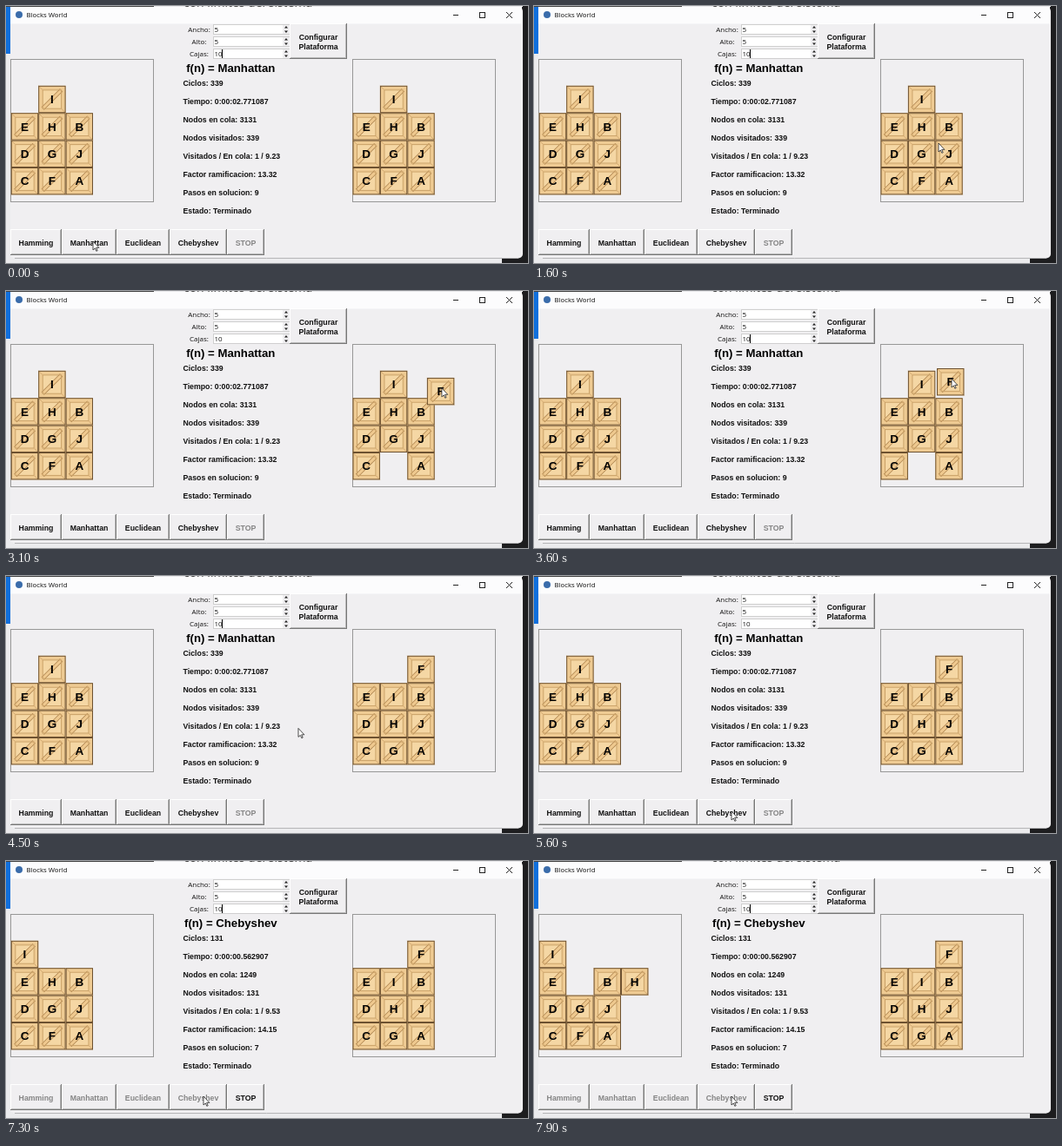
Write an HTML page with a canvas that moves like this. It is 600x296 px and loops after 8000 ms.

```html
<!DOCTYPE html>
<html lang="es">
<head>
<meta charset="utf-8">
<title>Blocks World</title>
<style>
  html, body { margin: 0; width: 100%; height: 100%; overflow: hidden; }
  canvas { display: block; }
</style>
</head>
<body>
<canvas id="stage" width="600" height="296"></canvas>
<script>
const ctx = document.getElementById('stage').getContext('2d');
const LOOP = 8000, TICK = 100;
const CELL = 31.4, LEFT_X = 5.8, RIGHT_X = 398.5, FLOOR_Y = 186;
const UI = '"Open Sans", sans-serif';
const BOLD = '"Liberation Sans", Arial, sans-serif';
const LABEL = 'bold 8.75px ' + BOLD;
const FACE = '#f0eff1', INK = '#111';

const GRAB = 2500, DROP = 4000, RUN = 6200, DONE = 6900;
const START = ['CDE', 'FGHI', 'AJB'];
const GOAL = ['CDE', 'GHI', 'AJBF'];
const ARROW = new Path2D('M0 0V10L2.3 8 3.8 11.3 5.2 10.7 3.7 7.4H6.9Z');

// Where the hand passes: the first button, the crate, its new place, the last button.
const HAND = [
  { t: 100, x: 100, y: 271 },
  { t: 1600, x: 465, y: 158 },
  { t: 2300, x: 447, y: 198 },
  { t: GRAB, x: 447, y: 198 },
  { t: 2700, x: 485, y: 153 },
  { t: 3050, x: 503, y: 113 },
  { t: 3600, x: 480, y: 101 },
  { t: 4200, x: 480, y: 101 },
  { t: 4700, x: 240, y: 225 },
  { t: 5400, x: 227, y: 271 }
];

// Each crate of the solution rises one cell, shifts sideways and then sinks.
const SOLUTION = [
  { letter: 'I', begin: 7100, col: 1, row: 3, shift: -1 },
  { letter: 'H', begin: 7600, col: 1, row: 2, shift: 2 }
];

const clamp = (v, low, high) => Math.min(high, Math.max(low, v));

function handAt(t) {
  const next = HAND.findIndex(stop => stop.t > t);
  if (next < 1) return HAND.at(next);
  const a = HAND[next - 1], b = HAND[next];
  const k = (t - a.t) / (b.t - a.t);
  return { x: a.x + (b.x - a.x) * k, y: a.y + (b.y - a.y) * k };
}

const cellAt = (x0, col, row) => ({ x: x0 + col * CELL, y: FLOOR_Y - row * CELL });

function rect(x, y, w, h, color) {
  ctx.fillStyle = color;
  ctx.fillRect(x, y, w, h);
}

function frame(x, y, w, h, color) {
  ctx.strokeStyle = color;
  ctx.lineWidth = 1;
  ctx.strokeRect(x + .5, y + .5, w - 1, h - 1);
}

function line(x1, y1, x2, y2, color, width = 1) {
  ctx.strokeStyle = color;
  ctx.lineWidth = width;
  ctx.beginPath();
  ctx.moveTo(x1, y1);
  ctx.lineTo(x2, y2);
  ctx.stroke();
}

function spinArrow(x, y, height) {
  ctx.fillStyle = '#222';
  ctx.beginPath();
  ctx.moveTo(x - 2, y);
  ctx.lineTo(x + 2, y);
  ctx.lineTo(x, y + height);
  ctx.fill();
}

function text(str, x, y, font, align = 'left', color = INK) {
  ctx.font = font;
  ctx.textAlign = align;
  ctx.fillStyle = color;
  ctx.fillText(str, x, y);
}

function button(x, y, w, h, lines, enabled = true) {
  rect(x, y, w, h, '#777');
  rect(x, y, w - 1, h - 1, '#fff');
  rect(x + 1, y + 1, w - 2, h - 2, '#b8b8b8');
  rect(x + 1, y + 1, w - 3, h - 3, FACE);
  lines.forEach((str, i) => {
    const dy = (i - (lines.length - 1) / 2) * 11;
    text(str, x + w / 2, y + h / 2 + dy + 3.6, LABEL, 'center', enabled ? INK : '#858585');
  });
}

function toolbar(running) {
  let x = 5;
  for (const name of ['Hamming', 'Manhattan', 'Euclidean', 'Chebyshev', 'STOP']) {
    ctx.font = LABEL;
    const width = Math.round(ctx.measureText(name).width + 19.2);
    button(x, 257, width, 30, [name], (name === 'STOP') === running);
    x += width;
  }
}

function spinbox(label, value, y) {
  text(label, 222, y + 9, '8px ' + UI, 'center');
  rect(238, y, 88, 12, '#fff');
  frame(238, y, 88, 12, '#cfcfcf');
  rect(318, y + 1, 8, 10, FACE);
  spinArrow(322, y + 4.5, -2.5);
  spinArrow(322, y + 7.5, 2.5);
  text(value, 239.5, y + 9, '8px ' + UI);
}

function crate(letter, { x, y }) {
  ctx.save();
  ctx.translate(x, y);
  rect(0, 0, CELL, CELL, '#efcb93');
  line(0, 0, CELL, CELL, '#c79d63', .7);
  frame(0, 0, CELL, CELL, '#6d5130');
  rect(4.5, 4.5, 22.4, 22.4, '#f5d7a4');
  line(5, 26.4, 26.4, 5, '#a77c47', 4.6);
  line(5, 26.4, 26.4, 5, '#efc98f', 3.3);
  frame(4.5, 4.5, 22.4, 22.4, '#c9a066');
  text(letter, CELL / 2, 20.4, 'bold 13.5px ' + BOLD, 'center', '#000');
  ctx.restore();
}

function platform(x0, stacks, moved) {
  frame(Math.floor(x0), 61, 165, 165, '#979797');
  const placed = {};
  stacks.forEach((stack, col) => [...stack].forEach((letter, row) => {
    placed[letter] = moved[letter] || cellAt(x0, col, row);
  }));
  // Crates overlap in alphabetical order.
  Object.keys(placed).sort().forEach(letter => crate(letter, placed[letter]));
}

function solving(t) {
  const moved = {};
  for (const { letter, begin, col, row, shift } of SOLUTION) {
    const step = Math.floor((t - begin) / TICK) + 1;
    const span = Math.abs(shift);
    const sunk = clamp(step - 1 - span, 0, 1);
    moved[letter] = cellAt(LEFT_X,
      col + Math.sign(shift) * clamp(step - 1, 0, span),
      row + clamp(step, 0, 1) - sunk);
  }
  return moved;
}

function dragging(t) {
  if (t < GRAB || t >= DROP) return {};
  const { x, y } = handAt(t);
  return { F: { x: x - 17, y: y - 12 } };
}

function stats(t) {
  if (t < RUN)
    return { name: 'Manhattan', cycles: 339, time: 2.771087, queued: 3131, branching: 13.32, steps: 9 };
  if (t >= DONE)
    return { name: 'Chebyshev', cycles: 131, time: .562907, queued: 1249, branching: 14.15, steps: 7 };
  const time = Math.max(.004911, .561911 + (t - 6800) / 1000);
  const cycles = Math.max(1, Math.round(time / .00432));
  return { name: 'Chebyshev', cycles, time, queued: Math.round(cycles * 9.615), branching: 14.25 };
}

function report(t) {
  const { name, cycles, time, queued, branching, steps } = stats(t);
  text('f(n) = ' + name, 258.3, 76, 'bold 13.2px ' + BOLD, 'center', '#000');
  const rows = [
    'Ciclos: ' + cycles,
    'Tiempo: 0:00:0' + time.toFixed(6),
    'Nodos en cola: ' + queued,
    'Nodos visitados: ' + cycles,
    // The ratio is cut, not rounded.
    'Visitados / En cola: 1 / ' + (Math.floor(queued / cycles * 100) / 100).toFixed(2),
    'Factor ramificacion: ' + branching
  ];
  if (steps) rows.push('Pasos en solucion: ' + steps, 'Estado: Terminado');
  rows.forEach((row, i) => text(row, 203.5, 91.7 + i * 21, LABEL));
}

function windowFrame() {
  rect(0, 0, 600, 296, '#ebebed');
  rect(0, 0, 6, 55, '#0f6fdc');
  rect(0, 0, 170, 1, '#444');
  rect(570, 1, 30, 295, '#1d1d1f');
  rect(594, 0, 6, 296, '#1d1d1f');
  text('con limites del sistema', 204, 1, '14px ' + UI, 'left', '#444');
  ctx.fillStyle = FACE;
  ctx.beginPath();
  ctx.roundRect(5, 1, 589, 289.5, [0, 5, 5, 5]);
  ctx.fill();
  line(10, 290.5, 589, 290.5, '#b5b5b7');
  rect(5, 1, 588, 19.5, '#fcfcfd');
  ctx.fillStyle = '#3a6cab';
  ctx.beginPath();
  ctx.arc(15, 10, 4, 0, 2 * Math.PI);
  ctx.fill();
  text('Blocks World', 23.5, 13.2, '7.8px ' + UI);
  line(514, 10.5, 520, 10.5, '#222');
  frame(544, 7, 7, 7, '#222');
  line(575, 7, 582, 14, '#222');
  line(582, 7, 575, 14, '#222');
}

function pointer({ x, y }) {
  ctx.save();
  ctx.translate(x, y);
  ctx.fillStyle = '#fff';
  ctx.strokeStyle = '#222';
  ctx.lineWidth = .8;
  ctx.fill(ARROW);
  ctx.stroke(ARROW);
  ctx.restore();
}

function draw(t) {
  windowFrame();
  ['Ancho:', 'Alto:', 'Cajas:'].forEach((label, i) => spinbox(label, i < 2 ? '5' : '10', 21 + 14 * i));
  const caretOn = (t + 400) % 900 < 600;
  if (caretOn) rect(248, 50, 1, 10, '#000');
  button(326, 20, 66, 41, ['Configurar', 'Plataforma']);
  report(t);
  platform(LEFT_X, START, solving(t));
  platform(RIGHT_X, t < DROP ? START : GOAL, dragging(t));
  toolbar(t >= RUN);
  pointer(handAt(t));
}

function tick() {
  const t = performance.now() % LOOP;
  draw(Math.floor(t / TICK) * TICK);
  requestAnimationFrame(tick);
}
tick();
</script>
</body>
</html>
```
